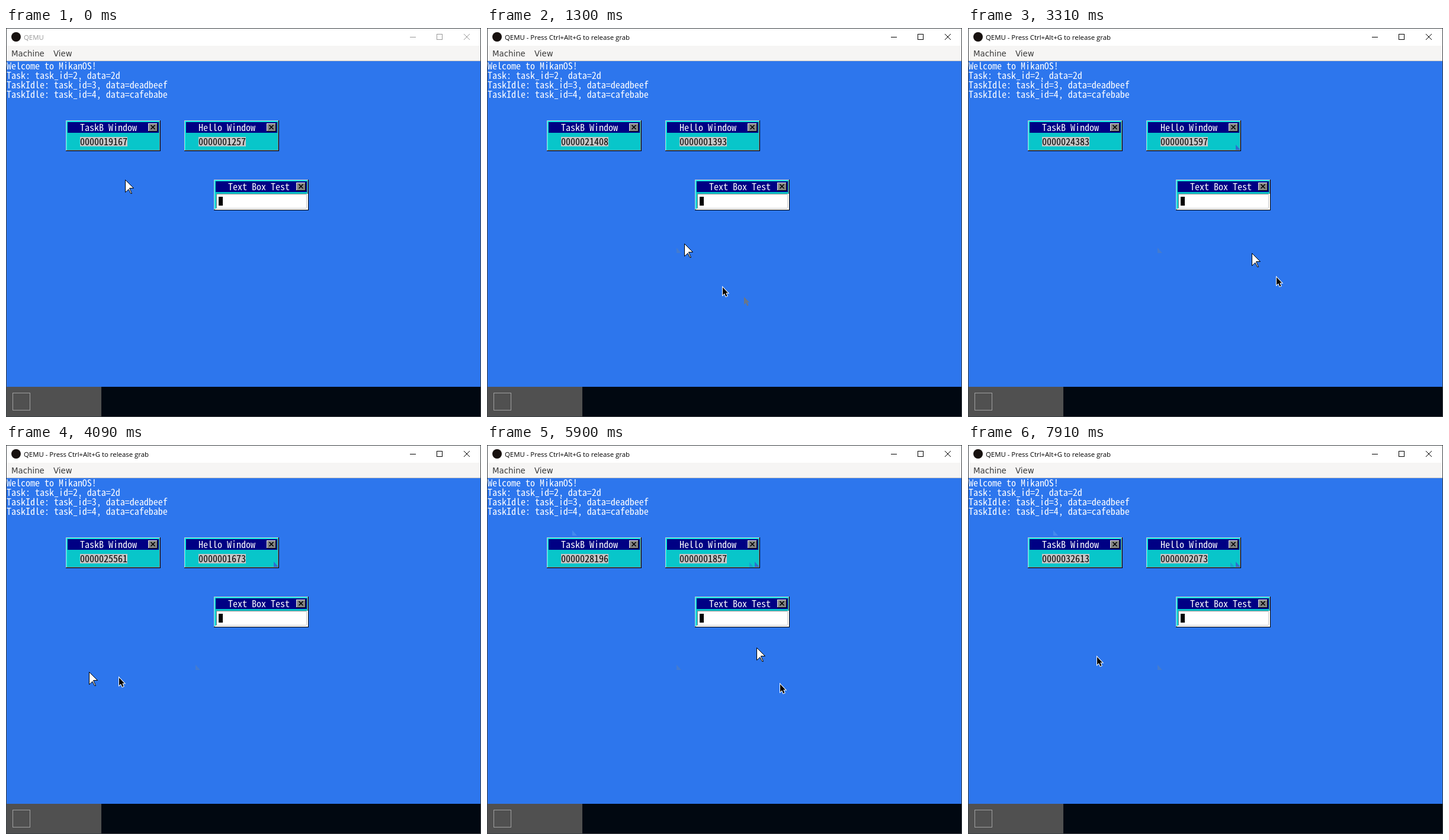
Write an HTML page with a canvas that moves like this. It is 802 by 657 pixels and loops after 7.99 s.

```html
<!DOCTYPE html>
<html lang="en">
<head>
<meta charset="utf-8">
<title>QEMU</title>
<style>
  html, body { margin: 0; width: 100%; height: 100%; overflow: hidden; background: #fff; }
  canvas { display: block; width: 802px; height: 657px; }
</style>
</head>
<body>
<canvas id="stage" width="802" height="657"></canvas>
<script>
const ctx = document.getElementById('stage').getContext('2d');
const LOOP = 7990;
const STEPS = 103;
const TEAL = '#08c6ca', LIGHT = '#c6c6c6', SHADE = '#848484';

// Key poses; `sweep` is the size of the loop both pointers make on the way to the next pose.
const POSES = [
  { step: 0, taskB: 19167, hello: 1257, guest: [201, 256], host: [433, 453], sweep: [0, 0] },
  { step: 17, taskB: 21408, hello: 1393, guest: [333, 364], host: [397, 437], sweep: [75, 50] },
  { step: 33, taskB: 23204, hello: 1521, guest: [298, 377], host: [329, 447], sweep: [130, 110] },
  { step: 53, taskB: 25561, hello: 1673, guest: [140, 383], host: [190, 392], sweep: [180, 60] },
  { step: 66, taskB: 26990, hello: 1777, guest: [212, 353], host: [244, 412], sweep: [110, 120] },
  { step: 86, taskB: 29401, hello: 1936, guest: [258, 331], host: [304, 393], sweep: [0, 0] },
  { step: 102, taskB: 31400, hello: 2057, guest: [258, 331], host: [304, 393], sweep: [0, 0] }
];
const GRAB_STEP = 6;

const GUEST_ARROW = new Path2D('M.5 .5L14.5 14.5H7.5L11.5 23.5H9.5L6 16.5L.5 21.5Z');
const HOST_ARROW = new Path2D('M1 1V14L4 11.2L6.3 16.5L8.5 15.5L6.3 10.5H10Z');
const SMEAR = new Path2D('M0 0L8 9H0Z');

// Console glyphs are 8 px apart.
const MONO = '"Noto Sans Mono CJK JP", "Noto Sans Mono", "Liberation Mono", monospace';
ctx.font = `300 16px ${MONO}`;
const CONSOLE_FONT = `300 ${128 / ctx.measureText('0').width}px ${MONO}`;
const TITLE_FONT = '11.4px "Open Sans", sans-serif';
const MENU_FONT = '13.33px "DejaVu Sans", sans-serif';

const mix = (a, b, u) => a + (b - a) * u;

function rect(x, y, w, h, color) {
  ctx.fillStyle = color;
  ctx.fillRect(x, y, w, h);
}

function outline(x, y, w, h, color) {
  ctx.strokeStyle = color;
  ctx.lineWidth = 1;
  ctx.strokeRect(x + 0.5, y + 0.5, w - 1, h - 1);
}

function label(text, x, baseline, color, font = CONSOLE_FONT) {
  ctx.font = font;
  ctx.fillStyle = color;
  ctx.fillText(text, x, baseline);
}

function cross(x, y, size, color, width) {
  ctx.strokeStyle = color;
  ctx.lineWidth = width;
  ctx.beginPath();
  ctx.moveTo(x, y);
  ctx.lineTo(x + size, y + size);
  ctx.moveTo(x + size, y);
  ctx.lineTo(x, y + size);
  ctx.stroke();
}

function shapeAt(shape, x, y, paint) {
  ctx.save();
  ctx.translate(Math.round(x), Math.round(y));
  paint(shape);
  ctx.restore();
}

function smear(shape, x, y, color) {
  shapeAt(shape, x, y, path => {
    ctx.fillStyle = color;
    ctx.fill(path);
  });
}

function arrow(shape, [x, y], fill, edge, width) {
  shapeAt(shape, x, y, path => {
    ctx.fillStyle = fill;
    ctx.strokeStyle = edge;
    ctx.lineWidth = width;
    if (width > 1) {
      ctx.stroke(path);
      ctx.fill(path);
    } else {
      ctx.fill(path);
      ctx.stroke(path);
    }
  });
}

function poseAt(step) {
  const i = Math.max(0, Math.min(POSES.length - 2, POSES.findIndex(pose => pose.step > step) - 1));
  const a = POSES[i], b = POSES[i + 1];
  const u = (step - a.step) / (b.step - a.step);
  const angle = 2 * Math.PI * u;
  const swing = [a.sweep[0] * (1 - Math.cos(angle)), -a.sweep[1] * Math.sin(angle)];
  const pointer = name => swing.map((offset, axis) => mix(a[name][axis], b[name][axis], u) + offset);
  return {
    taskB: Math.round(mix(a.taskB, b.taskB, u)),
    hello: Math.round(mix(a.hello, b.hello, u)),
    guest: pointer('guest'),
    host: pointer('host')
  };
}

function hostFrame(grabbed) {
  const ink = grabbed ? '#000' : '#999';
  rect(0, 0, 802, 657, '#fff');
  rect(1, 30, 800, 26, '#f6f5f4');
  rect(1, 55, 800, 1, '#cdc7c2');
  ctx.fillStyle = '#17110f';
  ctx.beginPath();
  ctx.arc(17, 15, 8, 0, 7);
  ctx.fill();
  label(grabbed ? 'QEMU - Press Ctrl+Alt+G to release grab' : 'QEMU', 30, 20, ink, TITLE_FONT);
  rect(682, 15, 10, 1, ink);
  outline(727, 10, 10, 10, ink);
  cross(773, 10, 10, ink, 1);
  label('Machine', 9, 48, '#3a3a3a', MENU_FONT);
  label('View', 80, 48, '#3a3a3a', MENU_FONT);
}

function desktop() {
  rect(1, 56, 800, 550, '#2d76ed');
  rect(1, 606, 800, 50, '#010811');
  rect(1, 606, 160, 50, '#505050');
  outline(11, 616, 30, 30, '#a0a0a0');
  [
    'Welcome to MikanOS!',
    'Task: task_id=2, data=2d',
    'TaskIdle: task_id=3, data=deadbeef',
    'TaskIdle: task_id=4, data=cafebabe'
  ].forEach((text, row) => label(text, 1, 70 + row * 16, '#fff'));
}

function guestWindow(x, y, title) {
  rect(x, y, 160, 52, '#000');
  rect(x, y, 159, 51, LIGHT);
  rect(x + 1, y + 1, 158, 50, SHADE);
  rect(x + 1, y + 1, 157, 49, '#0ff');
  rect(x + 2, y + 2, 156, 48, TEAL);
  rect(x + 3, y + 3, 154, 18, '#000084');
  label(title, x + 24, y + 18, '#fff');

  rect(x + 139, y + 5, 16, 14, '#000');
  rect(x + 139, y + 5, 15, 13, '#e8e8e8');
  rect(x + 140, y + 6, 14, 12, SHADE);
  cross(x + 143.5, y + 8, 7, '#000', 1.6);
}

function counterWindow(x, y, title, value) {
  guestWindow(x, y, title);
  rect(x + 24, y + 28, 80, 16, LIGHT);
  label(String(value).padStart(10, '0'), x + 24, y + 42, '#000');
}

function textBox(x, y, caret) {
  guestWindow(x, y, 'Text Box Test');
  rect(x + 4, y + 24, 155, 27, '#fff');
  rect(x + 2, y + 49, 157, 2, '#fff');
  rect(x + 4, y + 24, 152, 1, SHADE);
  rect(x + 4, y + 24, 1, 24, SHADE);
  rect(x + 4, y + 48, 152, 1, LIGHT);
  rect(x + 156, y + 24, 1, 24, LIGHT);
  if (caret) rect(x + 8, y + 29, 7, 15, '#000');
}

// Faint marks the pointers leave behind.
function smears(step) {
  if (step >= GRAB_STEP && step < 42) smear(HOST_ARROW, 433, 453, '#6b7686');
  if (step >= 12) smear(SMEAR, 320, 371, '#437bd0');
  if (step >= 42) smear(SMEAR, 452, 197, '#2d6fd0');
  if (step >= 60) smear(SMEAR, 443, 198, '#1d9cd0');
  if (step >= 72) smear(SMEAR, 144, 144, '#4289ee');
}

function draw(step) {
  const grabbed = step >= GRAB_STEP;
  const { taskB, hello, guest, host } = poseAt(step);

  hostFrame(grabbed);
  desktop();
  counterWindow(101, 156, 'TaskB Window', taskB);
  counterWindow(301, 156, 'Hello Window', hello);
  // The caret flips every 50 ticks of the Hello counter.
  textBox(351, 256, Math.floor(hello / 50) % 2 === 1);
  smears(step);
  arrow(GUEST_ARROW, guest, '#fff', '#000', 1);
  if (grabbed) arrow(HOST_ARROW, host, '#000', '#fff', 2);
  outline(0, 0, 802, 657, '#3c4044');
}

const start = performance.now();
function tick() {
  const t = (performance.now() - start) % LOOP;
  draw(Math.min(STEPS - 1, Math.floor(t / LOOP * STEPS + 0.45)));
  requestAnimationFrame(tick);
}
tick();
</script>
</body>
</html>
```
